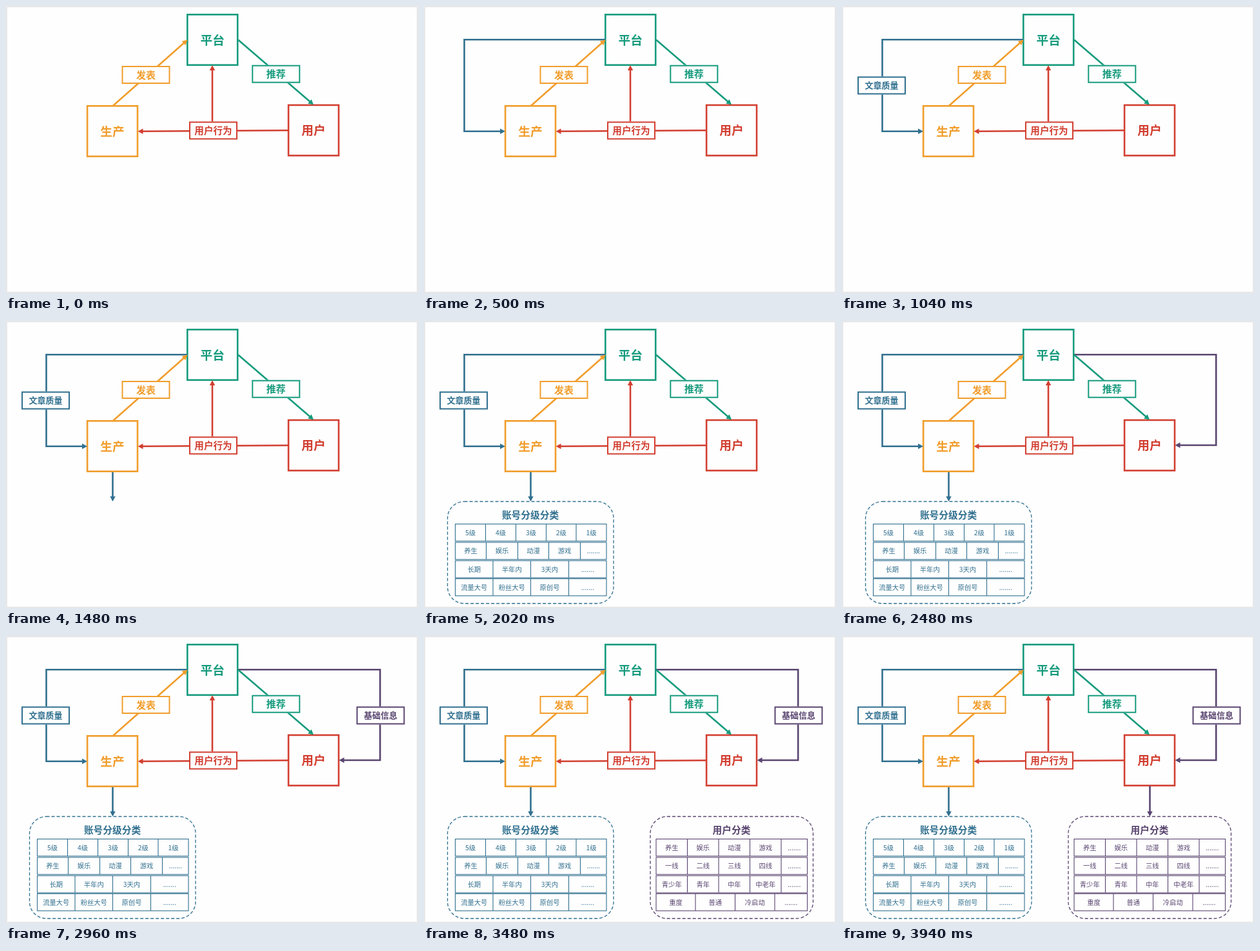
Animation, 639 px wide and 446 px high, one loop 8 s. Source, as an HTML page with a canvas:

```html
<!DOCTYPE html>
<html lang="zh-CN">
<head>
<meta charset="utf-8">
<style>
html, body { margin: 0; width: 100%; height: 100%; overflow: hidden; background: #fefefe; }
canvas { display: block; width: 639px; height: 446px; }
</style>
</head>
<body>
<canvas id="stage"></canvas>
<script>
const W = 639, H = 446, LOOP = 8000;
const canvas = document.getElementById('stage');
const ctx = canvas.getContext('2d');
const ratio = window.devicePixelRatio || 1;
canvas.width = W * ratio;
canvas.height = H * ratio;

const PAPER = '#fefefe', GREEN = '#169b7d', ORANGE = '#f19d2c',
      RED = '#d23f31', BLUE = '#31708f', PURPLE = '#594570';
const FONT = '"Noto Sans CJK SC", "Noto Sans CJK", sans-serif';
const ROWS = [315.5, 344, 372.5, 400.5];
const ROW_H = 26.5;

function text(str, x, y, size, color, weight = 700) {
  ctx.font = `${weight} ${size}px ${FONT}`;
  ctx.textAlign = 'center';
  ctx.fillStyle = color;
  ctx.fillText(str, x, y + size * 0.38);
}

function box(str, x, y, w, h, size, color, line) {
  ctx.fillStyle = PAPER;
  ctx.fillRect(x, y, w, h);
  ctx.strokeStyle = color;
  ctx.lineWidth = line;
  ctx.strokeRect(x + line / 2, y + line / 2, w - line, h - line);
  text(str, x + w / 2, y + h / 2, size, color);
}

const node = (str, x, y, color) => box(str, x, y, 80.5, 81, 18.7, color, 2.6);
const label = (str, x, y, size, color) => box(str, x, y, 75, 28, size, color, 2);

// Polyline through the points, with an arrowhead at the last one
function arrow(color, ...pts) {
  const [tx, ty] = pts[pts.length - 1];
  const [px, py] = pts[pts.length - 2];
  const angle = Math.atan2(ty - py, tx - px);
  const c = Math.cos(angle), s = Math.sin(angle);
  ctx.strokeStyle = ctx.fillStyle = color;
  ctx.lineWidth = 2.6;
  ctx.beginPath();
  pts.slice(0, -1).forEach(p => ctx.lineTo(...p));
  ctx.lineTo(tx - 6 * c, ty - 6 * s);
  ctx.stroke();
  ctx.beginPath();
  ctx.moveTo(tx, ty);
  ctx.lineTo(tx - 8 * c - 4.2 * s, ty - 8 * s + 4.2 * c);
  ctx.lineTo(tx - 8 * c + 4.2 * s, ty - 8 * s - 4.2 * c);
  ctx.fill();
}

function row(words, edges, y, color) {
  const last = edges[edges.length - 1];
  ctx.strokeStyle = color;
  ctx.lineWidth = 1.1;
  ctx.strokeRect(edges[0], y, last - edges[0], ROW_H);
  ctx.beginPath();
  edges.slice(1, -1).forEach(x => {
    ctx.moveTo(x, y);
    ctx.lineTo(x, y + ROW_H);
  });
  ctx.stroke();
  words.split(' ').forEach((word, i) =>
    text(word, (edges[i] + edges[i + 1]) / 2, y + ROW_H / 2, 10.3, color, 400));
}

function panel(title, x, w, titleX, color, rows) {
  ctx.strokeStyle = color;
  ctx.lineWidth = 1.3;
  ctx.setLineDash([5, 3]);
  ctx.beginPath();
  ctx.roundRect(x, 280.5, w, 158.5, 26);
  ctx.stroke();
  ctx.setLineDash([]);
  text(title, titleX, 301, 14.7, color);
  rows.forEach(([words, edges], i) => row(words, edges, ROWS[i], color));
}

const quarters = [48.5, 107, 165.5, 224.5, 283];
const accounts = [
  ['5级 4级 3级 2级 1级', [48.5, 95.5, 142.5, 189.5, 236, 283]],
  ['养生 娱乐 动漫 游戏 .......', [48.5, 96.5, 145.5, 193.5, 242.5, 283]],
  ['长期 半年内 3天内 .......', quarters],
  ['流量大号 粉丝大号 原创号 .......', quarters]
];
const fifths = [360, 408.5, 457, 505.5, 554, 594.5];
const users = [
  ['养生 娱乐 动漫 游戏 .......', fifths],
  ['一线 二线 三线 四线 .......', fifths],
  ['青少年 青年 中年 中老年 .......', fifths],
  ['重度 普通 冷启动 .......', [360, 421, 482.5, 544, 594.5]]
];

// Parts that pop in, each from its start time on
const steps = [
  [500, () => arrow(BLUE, [281, 52.2], [62.5, 52.2], [62.5, 194.7], [126, 194.7])],
  [1040, () => label('文章质量', 24, 109.5, 13, BLUE)],
  [1480, () => arrow(BLUE, [165.5, 235], [165.5, 280.5])],
  [2020, () => panel('账号分级分类', 36.5, 257.5, 165, BLUE, accounts)],
  [2480, () => arrow(PURPLE, [360, 52.2], [580.2, 52.2], [580.2, 193], [516.5, 193])],
  [2960, () => label('基础信息', 543.5, 109.5, 13, PURPLE)],
  [3480, () => panel('用户分类', 351, 252.5, 477, PURPLE, users)],
  [3940, () => arrow(PURPLE, [477.5, 233], [477.5, 280.5])]
];

function base() {
  arrow(ORANGE, [166, 155], [281.5, 52.5]);
  arrow(GREEN, [360, 52.5], [477, 153.5]);
  arrow(RED, [320, 181], [320, 92]);
  arrow(RED, [437, 193.2], [204.5, 194.8]);
  label('发表', 179.5, 93, 15, ORANGE);
  label('推荐', 381.3, 91.7, 15, GREEN);
  label('用户行为', 284, 179.5, 14.6, RED);
}

function draw(t) {
  ctx.setTransform(ratio, 0, 0, ratio, 0, 0);
  ctx.fillStyle = '#e8e8e8';
  ctx.fillRect(0, 0, W, H);
  ctx.fillStyle = PAPER;
  ctx.fillRect(2, 2, W - 4, H - 4);
  node('平台', 280, 12, GREEN);
  node('生产', 124.8, 154, ORANGE);
  node('用户', 436.8, 152.7, RED);
  steps.forEach(([start, paint]) => t >= start && paint());
  base();
}

const origin = performance.now();
function tick() {
  draw((performance.now() - origin) % LOOP);
  requestAnimationFrame(tick);
}
tick();
</script>
</body>
</html>
```
